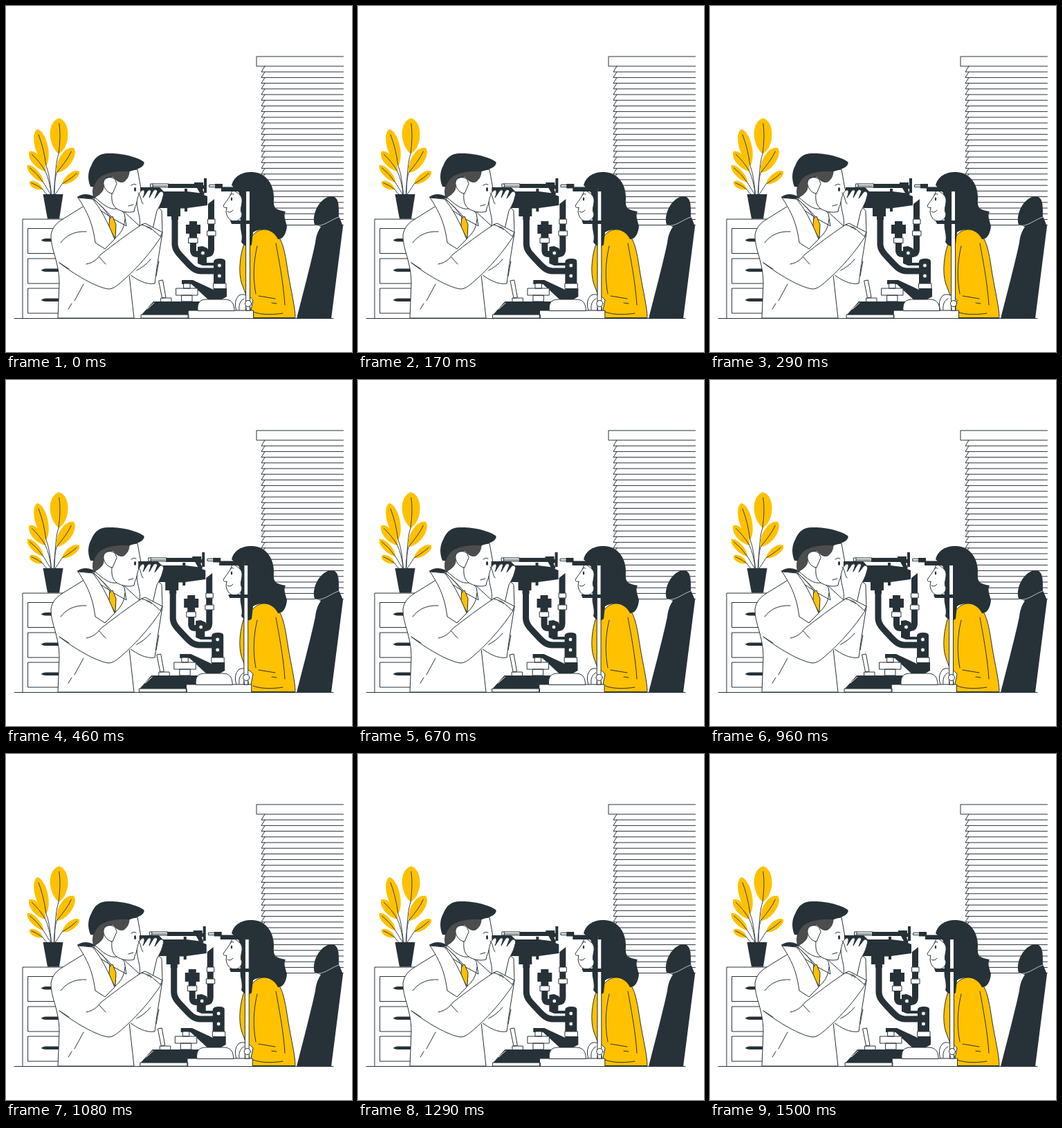
An HTML page that plays this animation: 500x500 px, repeating every 1.54 s.

```html
<!DOCTYPE html>
<html lang="en">
<head>
<meta charset="utf-8">
<title>Eye examination</title>
<style>
  html, body { margin: 0; height: 100%; overflow: hidden; background: #fff; }
  svg { display: block; width: 100%; height: 100%; }
  path, rect, circle, ellipse { stroke: #263238; stroke-linejoin: round; stroke-linecap: round; fill: none; }
  .d { fill: #263238; stroke: none; }
  .w { fill: #fff; }
  .y { fill: #ffc100; }
  .leaf { fill: #ffc100; stroke: none; }
  .white { stroke: #fff; }
</style>
</head>
<body>
<svg viewBox="0 0 500 500">
  <!-- window blind -->
  <path class="w" d="M487.5 73H362V87H487.5"/>
  <path id="slats"/>

  <!-- chair -->
  <path class="d" d="M446 316C441 300 454 277 469 275C482 274 481 290 481 304L487 318L470 451.5L420 452C428 420 440 375 447 342C448 332 451 325 455 319L446 316Z"/>
  <path class="white" stroke-width=".7" d="M447 317C458 320 470 308 481 305"/>

  <!-- cabinet -->
  <path class="w" d="M24 451V308H90V451"/>
  <g id="drawers"></g>

  <!-- plant -->
  <g id="leaves"></g>
  <path class="d" d="M53.500 272H82.500L77 307.500H60Z"/>

  <path d="M12 451.500H473"/>

  <!-- patient -->
  <path class="y" d="M346 338C338 358 335 385 341 402L347 418L355 450.500H418C418 436 412 412 408 388C403 355 400 337 389 328C378 320 364 321 355 333Z"/>
  <path d="M390 343C394 365 401 400 403 432M363 347C357 372 357 395 361 416M365 419L389 423M384 429L391 430M357 442C370 447 388 446 400 444"/>
  <path class="d" d="M326 259C330 244 344 239 357 240C377 241 388 260 387 279C386 293 390 294 404 297C401 303 403 307 406 318C405 330 400 337 393 337C388 325 372 318 357 327L355 345C350 350 343 346 340 341C343 331 337 322 339 313L337 270Z"/>
  <path class="w" d="M327 266C325 275 319 281 315 287C313 290 315 292 319 291L318 297C319 305 323 311 331 311C338 310 341 305 341 300C337 294 342 287 341 279C340 273 334 269 327 266Z"/>
  <ellipse class="d" cx="326" cy="279" rx="1.200" ry="2.500"/>
  <path d="M324 273Q327 270 329 272M320 297Q324 300 328 295"/>
  <path class="w" d="M333 440C330 432 331 423 337 418C342 415 352 418 357 425L354 440ZM337 439C336 431 339 425 344 423"/>

  <!-- doctor: body and head -->
  <path class="w" d="M104 276L118 284L150 304L168 295L193 318L178 388L185 451H75L77 400C77 370 64 350 65 331C67 319 73 314 82 308L116 287Z"/>
  <path class="w" d="M126 277C132 286 145 294 154 307L174 318L171 300L158 285Z"/>
  <path class="y" d="M150 306L154 304L159 316L158 336L149 322Z"/>
  <path class="d" d="M103 276C110 271 118 271 127 275L125 279L107 277Z"/>
  <path class="w" d="M104 277L125 279C136 291 147 312 157 337L143 351L129 342C126 320 121 302 104 277Z"/>
  <path d="M126 279C137 287 145 297 151 307M157 336C165 330 171 321 172 308M79 342C86 333 97 325 116 326"/>
  <path class="w" d="M128 276C140 287 150 295 160 293C168 298 178 299 185 297L186 292C189 285 190 281 191 277C196 274 197 270 195 264L190 236L150 238Z"/>
  <path d="M160 293C154 289 152 281 153 271M181 259Q185 256 188 258M177 289L184 287"/>
  <ellipse class="d" cx="186.500" cy="265" rx="1.500" ry="3"/>
  <path class="d" d="M122 261C117 249 119 238 123 231C128 218 136 213 147 213C165 212 190 218 199 225C202 230 193 236 182 238C173 242 161 241 153 247L130 262Z"/>
  <path fill="#4d4d4d" stroke-width=".8" style="fill:#4d4d4d" d="M127 277C123 266 127 254 137 246C146 240 165 237 178 239C178 245 175 251 170 254C164 256 159 252 155 247C147 246 141 250 140 257C143 263 140 271 127 277Z"/>
  <path class="w" d="M157 250C152 246 143 247 141 254C140 261 146 271 154 271L160 257Z"/>

  <!-- slit lamp -->
  <g id="lamp">
    <path class="w" d="M209 257H235V262H209ZM212 257V262M212 260H233"/>
    <path class="d" d="M234 257H272V255H285V259H286V249H290V270H286V264L284 265L287 272H281L276 263H234Z"/>
    <path class="w" d="M294 258.500H303V261.500H294Z"/>
    <path class="d" d="M302 257H313V261.500H352V268H311V263.500H302Z"/>
    <path class="d" d="M194 262H222L228 268H258V264H262V268L286 271V273L291 275V288L262 292V297H258V292.500H252V304H249V309H239V304H233V292H220L210 280L194 274Z"/>
    <path stroke-width="9" stroke-linecap="butt" d="M244 304V344C244 354 252 360 260 369C269 379 274 383 282 383H303"/>
    <path stroke-width="9" stroke-linecap="butt" d="M270.500 342V354Q271 358.500 276 358.500H291Q296.500 358 296.500 352V315"/>
    <path class="d" d="M260 316H265V311H276V316H281V329H276V335H265V329H260ZM292 286L301 279V308H292ZM277 348L284 347L291 350L294 357L290 364V371H301V375H284L277 372Z"/>
    <path class="w" d="M264 335H277V342.500H264ZM292 308H302V315H292ZM291 325H303V332H291Z"/>
    <path class="d" d="M254 396H270L300 410V408H319V420L310 425H293L268 402H254ZM300 369Q301 365 309 365Q317 365 317 369V401H300Z"/>
    <circle class="w" cx="284.500" cy="357" r="3"/>
    <circle class="w" cx="308.500" cy="375" r="3"/>
    <circle class="w" cx="308.500" cy="390" r="3"/>
    <path class="w" d="M300 401H318V408.500H300ZM257 401H266V408H257ZM246 408H277V418H246ZM254 418H269V427H254Z"/>
    <path class="w" d="M221 397L226.500 396L231 421L226 422ZM224 422H239V428H224Z"/>
    <path class="d" d="M196 446L213 427H280V446Z"/>
    <path class="white" d="M204 438L214 429"/>
    <path class="w" d="M195.500 446H264V451H195.500ZM263.500 440H357.500V451.500H263.500Z"/>
    <path class="w" d="M277 440C276 428 281 424 290 424H316C325 424 330 429 330 440Z"/>
    <path class="w" d="M347 257H352.500V440H347Z"/>
    <path class="d" d="M346 255H353V262H346ZM324 310H353V315H326ZM347 261H353V268H347Z"/>
    <circle class="w" cx="350" cy="430" r="4.500"/>
    <path d="M347 436V440M353 436V440"/>
  </g>

  <!-- doctor: arms and hands -->
  <path class="w" d="M225 296L226 328L218 378L215 401C202 403 190 396 179 388L212 318L218 290Z"/>
  <path d="M221 369L217 390M187 383Q200 377 209 366"/>
  <path class="w" d="M189 284C190 276 193 268 197 266C202 265 200 272 198 277L204 268C207 264 211 266 209 270L207 277L213 267C216 264 220 266 218 270L215 278L222 269C226 266 229 270 227 275C225 284 221 291 218 296L212 322L193 318C195 306 190 298 189 284Z"/>
  <path d="M191 270C196 276 194 281 198 286"/>
  <path fill="#fff" style="fill:#fff;stroke:none" d="M78 372L133 360L196 316L224 332L187 384L150 409Z"/>
  <path d="M77 371C97 387 131 407 148 409C156 409 163 402 171 395C189 379 209 357 225 332M116 373C126 371 132 366 137 359C154 346 176 329 196 316M77 371L91 380"/>
  <path class="w" d="M196 316L201 314L226 327L223 333L208 320Z"/>
  <path d="M134 362L144 373M99 426L112 402M90 438L95 430"/>
</svg>
<script>
  const byId = id => document.getElementById(id);

  byId('slats').setAttribute('d', Array.from({ length: 28 }, (_, i) => {
    const y = 87 + i * 8.2;
    return `M374 ${y}L369 ${y + 8.2}H487.5`;
  }).join(''));

  byId('drawers').innerHTML = [321.5, 365, 408].map(y =>
    `<path class="w" d="M32 ${y}H90V${y + 36}H32Z"/>
     <path class="d" d="M51 ${y + 17}Q53 ${y + 14} 60 ${y + 14.5}H80V${y + 19}H60Q53 ${y + 19} 51 ${y + 17}Z"/>`
  ).join('');

  // Each leaf: tip x, tip y, base x, base y, width
  byId('leaves').innerHTML = [
    [77, 162, 76, 214, 24], [45, 178, 58, 231, 17], [34, 210, 57, 239, 13],
    [98, 205, 73, 241, 17], [106, 239, 81, 257, 11], [31, 230, 54, 255, 10],
    [34, 254, 53, 265, 9]
  ].map(([x, y, bx, by, width]) => {
    const dx = bx - x, dy = by - y, k = width / Math.hypot(dx, dy) * .72;
    const side = (f, s) => `${x + dx * f - dy * k * s} ${y + dy * f + dx * k * s}`;
    return `<path class="leaf" d="M${x} ${y}C${side(.1, 1)} ${side(.7, 1)} ${bx} ${by}C${side(.8, -1)} ${side(.1, -1)} ${x} ${y}Z"/>
      <path stroke-width=".9" d="M${x + dx * .15} ${y + dy * .15}Q${x + dx * .5 + 3} ${y + dy * .5} ${bx} ${by}Q${bx * .45 + 37} ${by + 12} ${bx * .25 + 51} 272"/>`;
  }).join('');

  // The CSS "ease" curve, solved for its parameter by bisection
  function ease(p) {
    let low = 0, high = 1, s = .5;
    for (let i = 0; i < 20; i++) {
      s = (low + high) / 2;
      const x = .75 * s * (1 - s) + s ** 3;
      if (x < p) low = s; else high = s;
    }
    return .3 * s * (1 - s) ** 2 + 3 * s * s * (1 - s) + s ** 3;
  }

  const LOOP = 1540, SHAKE = 1500, STEPS = 37;
  const stops = [0, -1, 2, -3, 3, -3, 3, -3, 2, -1, 0];

  function draw() {
    const step = Math.floor(performance.now() % LOOP / LOOP * STEPS + .1);
    const phase = Math.min(step * 1000 / 24 / SHAKE, .9999) * 10;
    const i = Math.floor(phase);
    const x = stops[i] + (stops[i + 1] - stops[i]) * ease(phase - i);
    byId('lamp').setAttribute('transform', `translate(${x.toFixed(2)} 0)`);
    requestAnimationFrame(draw);
  }
  draw();
</script>
</body>
</html>
```
